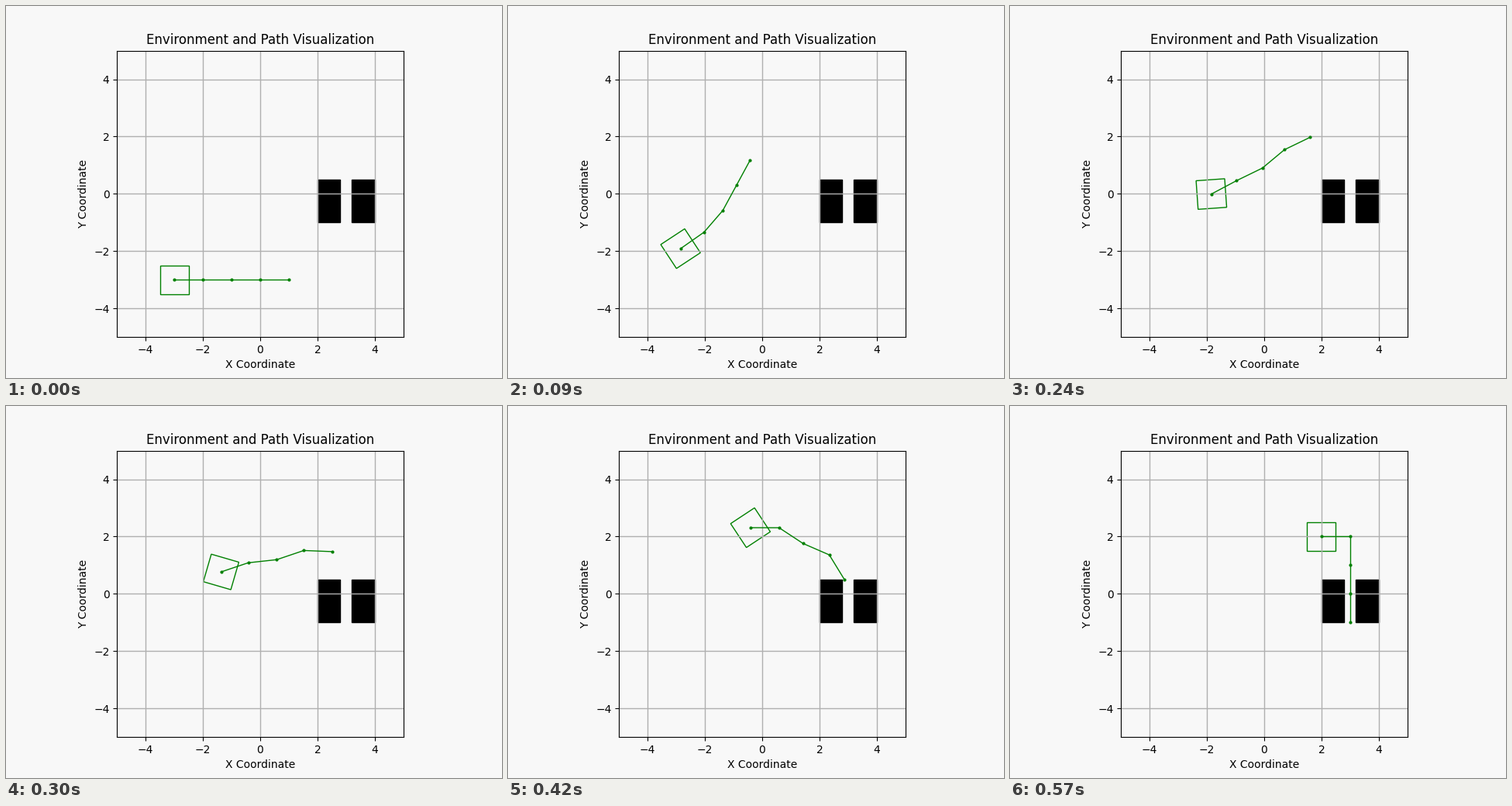
These frames come from a looping animation (640x480 px, 600 ms). A matplotlib script:

```python
import numpy as np
import matplotlib.pyplot as plt
from matplotlib.animation import FuncAnimation
from matplotlib.patches import Rectangle

FRAMES = 20
INTERVAL = 30
BG = "#f8f8f8"
GREEN = "green"


def pose(x, y, heading=0, *joints):
    """Base position, base heading and four joint angles in degrees."""
    return np.array([x, y, heading, *(joints or [0] * 4)], dtype=float)


START = pose(-3, -3)
CLIMB = pose(-2.8, -1.55, 44.4, 2.3, 18.8, 16.5, 0)
REACH = pose(-0.41, 2.31, -56.6, 56.5, -33.2, 9.8, -35)
GOAL = pose(2, 2, 0, 0, -90, 0, 0)

# Each leg: first step, last step, poses at both ends, easing power.
LEGS = [(0, 4, START, CLIMB, 1),
        (4, 14, CLIMB, REACH, 1),
        (14, FRAMES - 1, REACH, GOAL, 1.15)]


def pose_at(step):
    for first, last, a, b, power in LEGS:
        if step <= last:
            return a + (b - a) * ((step - first) / (last - first)) ** power


def arm_points(x, y, angles):
    """Joint positions of a chain of unit links."""
    heading = np.radians(np.cumsum(angles))[1:]
    xs = np.cumsum([x, *np.cos(heading)])
    ys = np.cumsum([y, *np.sin(heading)])
    return xs, ys


fig, ax = plt.subplots(figsize=(6.4, 4.8), dpi=100, facecolor=BG)
ax.set_facecolor(BG)
ax.set(xlim=(-5, 5), ylim=(-5, 5), aspect="equal",
       xticks=range(-4, 5, 2), yticks=range(-4, 5, 2),
       title="Environment and Path Visualization",
       xlabel="X Coordinate", ylabel="Y Coordinate")
ax.grid(True, linewidth=1)

for left in (2, 3.2):
    ax.add_patch(Rectangle((left, -1), 0.8, 1.5, color="black"))

base = Rectangle((0, 0), 1, 1, rotation_point="center", fill=False,
                 edgecolor=GREEN, linewidth=1)
ax.add_patch(base)
arm, = ax.plot([], [], "o-", color=GREEN, linewidth=1, markersize=2)


def update(step):
    x, y, *angles = pose_at(step)
    base.set_xy((x - 0.5, y - 0.5))
    base.set_angle(angles[0])
    arm.set_data(*arm_points(x, y, angles))
    return base, arm


anim = FuncAnimation(fig, update, frames=FRAMES, interval=INTERVAL,
                     repeat=True, repeat_delay=0)
plt.show()
```
